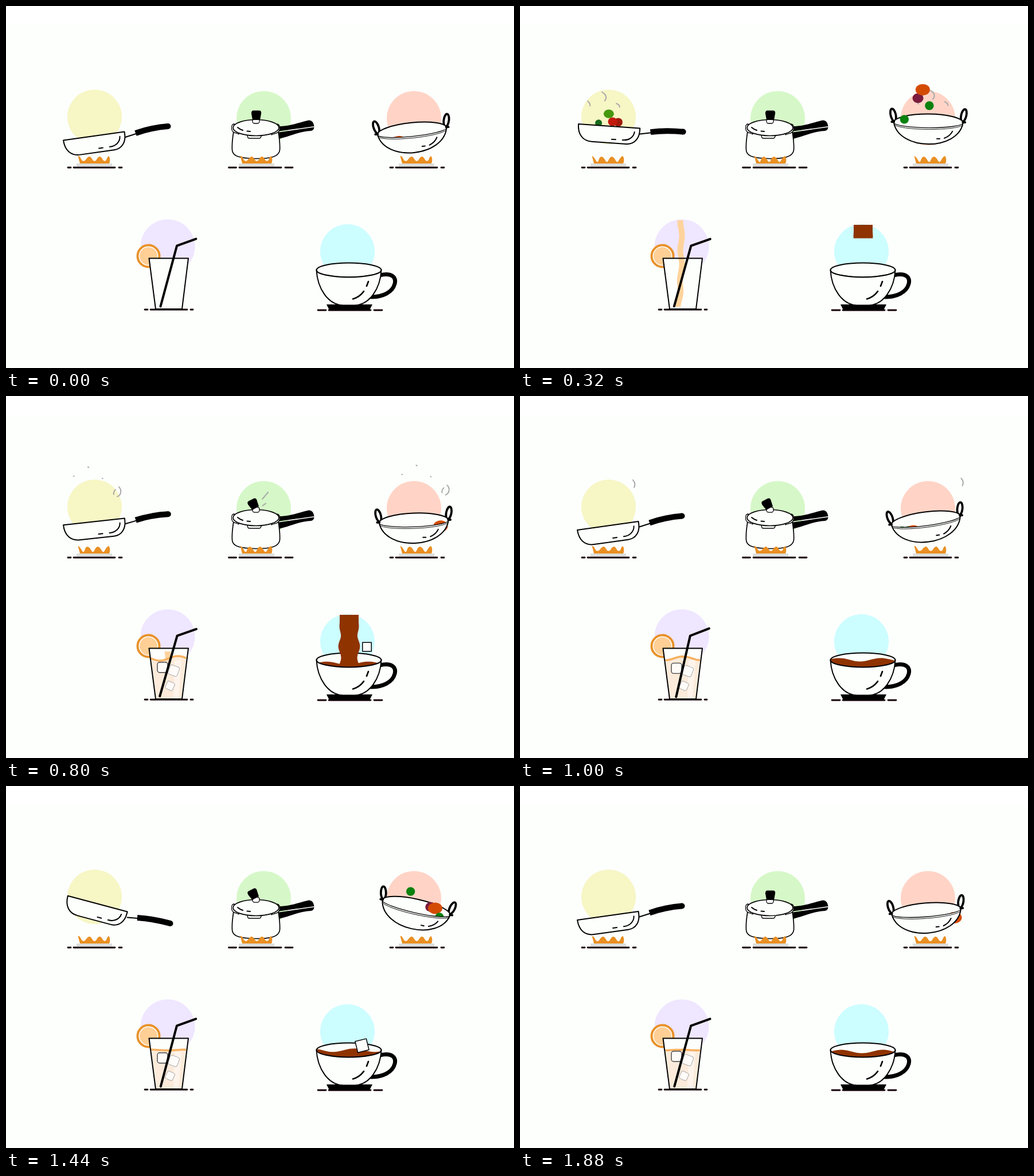
An HTML page for the animation above (1.92 s loop, 886 px wide and 632 px high).

```html
<!DOCTYPE html>
<html lang="en">
<head>
<meta charset="utf-8">
<title>Kitchen loop</title>
<style>
  html, body { margin: 0; width: 100%; height: 100%; overflow: hidden; background: #fff; }
  svg { display: block; width: 100vw; height: 100vh; }
  .line { fill: none; stroke: #000; stroke-width: 2; stroke-linecap: round; stroke-linejoin: round; }
  .body { fill: #fdfffd; stroke: #000; stroke-width: 2; stroke-linejoin: round; }
  .fill { fill: #fdfffd; }
  .thin { stroke-width: 1.3; }
  .thick { stroke-width: 3.8; }
  .floor { fill: none; stroke: #160008; stroke-width: 2.8; stroke-linecap: round; }
  .steam { fill: none; stroke: #a9a9a9; stroke-width: 2; stroke-linecap: round; }
  .flame { fill: #e98f23; }
  .coffee { fill: #8f3300; }
  .ice { fill: #fff; fill-opacity: .8; stroke: #aaa; }
</style>
</head>
<body>
<svg viewBox="0 0 886 632">
  <defs>
    <clipPath id="inGlass"><path d="M250.500 441H316.500L306 528H262Z"/></clipPath>
    <clipPath id="inCup"><ellipse cx="598" cy="461" rx="56" ry="12.500"/></clipPath>
  </defs>
  <rect class="fill" y="32" width="886" height="600"/>
  <circle cx="154.500" cy="193.500" r="47.500" fill="#f7f6c5"/>
  <circle cx="449.500" cy="196" r="47.500" fill="#d6f8c8"/>
  <circle cx="711.500" cy="196" r="47.500" fill="#ffd4c6"/>
  <circle cx="282" cy="420" r="47.500" fill="#efe6ff"/>
  <circle cx="595.500" cy="428.500" r="47.500" fill="#ccfdff"/>

  <!-- stoves -->
  <path fill="#dcdedc" d="M123 275h62v5h-62zM406 275h62v5h-62zM685 275h62v5h-62z"/>
  <path class="floor" d="M108 282h5M118 282h72M197 282h5M388.500 282h13M407 282h73M487 282h13M670 282h5M680 282h72M759 282h5M242 530h5M252 530h64M322 530h4M544 531h14M563 531h73M642 531h14"/>
  <path class="flame" id="flame0"/>
  <path class="flame" id="flame2" transform="translate(562)"/>

  <!-- frying pan -->
  <g id="panSteam"></g>
  <g id="panFood"></g>
  <path class="line" id="rod"/>
  <path id="grip" fill="none" stroke="#000" stroke-width="10"/>
  <circle id="gripEnd" r="5"/>
  <g id="pan">
    <path class="body" d="M-107.500 0H0V4C0 18-8 29-22 29H-82C-98 29-107.500 18-107.500 0Z"/>
    <path class="line" d="M-48 22.500h7M-29 22.500C-19 23-10 17-9 7"/>
  </g>

  <!-- pressure cooker -->
  <g id="rays"></g>
  <path d="M475 210C497 210 511 203 528 199.500Q536 199 537.500 210L477 218.500ZM476 220.500L537.500 211.500Q537 217 532 218C512 219 500 226 476 232Z"/>
  <path class="body" style="stroke-width:1.700" d="M397 219C394.500 234 394 243 394.500 251C395 263 409 266 435 266.500C463 266.500 476 263 477.500 251C478 242 477 232 475 219Z"/>
  <path class="body thin" d="M398 206Q393 206 393.500 214Q394 221 402 222L406 224L404 214ZM473 206Q478 207 477.500 215Q476 222 468 223L463 225L466 214Z"/>
  <path class="body thin" d="M420.500 224L422 230Q423 231 425 231H441Q444 231 444.500 229L446 224Z"/>
  <ellipse class="body" style="stroke-width:1.700" cx="436" cy="212.500" rx="40" ry="14"/>
  <path class="line" d="M404 212Q408 215.500 413 217M420.500 218.500L426 219"/>
  <rect class="body thin" id="knobBase" x="430" y="196" width="12" height="9" rx="3.500"/>
  <path id="knob" d="M431 182.500H442Q446 183 445 188L443 199H430L428 188Q427.500 183 431 182.500Z"/>
  <path class="flame" id="flame1" transform="translate(283)"/>

  <!-- wok -->
  <g id="wokSteam" transform="translate(572.500 -3)"></g>
  <g id="wokBack">
    <ellipse class="line thick" rx="4.500" ry="11" transform="translate(-61.500 -13) rotate(-13)"/>
    <ellipse class="line thick" rx="4.500" ry="11" transform="translate(61.500 -13) rotate(13)"/>
    <path class="fill" d="M-60.500 0A60.500 15 0 0 1 60.500 0A60.500 9 0 0 1-60.500 0Z"/>
    <path class="line" d="M-60.500 0A60.500 15 0 0 1 60.500 0"/>
  </g>
  <g id="wokFood"></g>
  <g id="wokFront">
    <path class="fill" d="M-60.500 0A60.500 9 0 0 0 60.500 0C56 25 28 37.500 0 37.500C-28 37.500-56 25-60.500 0Z"/>
    <path class="line" d="M60.500 0C56 25 28 37.500 0 37.500C-28 37.500-56 25-60.500 0"/>
    <path class="line thin" d="M-60.500 0A60.500 9 0 0 0 60.500 0"/>
    <path class="line" style="stroke-width:.900" d="M-59.500 4A60 9 0 0 0 59.500 4"/>
    <path class="line" d="M15 28h5M28 27Q38 23 42 15"/>
    <path class="line thick" d="M-64-1h4M60-1h4"/>
  </g>

  <!-- juice -->
  <circle cx="248.500" cy="436.500" r="19" fill="#fff" stroke="#e8922a" stroke-width="4"/>
  <circle cx="248.500" cy="436.500" r="15.500" fill="#ffcf96"/>
  <path class="fill" d="M249.500 440.500H318L307 529H261Z"/>
  <path id="juice" fill="#ffd39c"/>
  <g clip-path="url(#inGlass)">
    <path id="drink" fill="#fde6d2" opacity=".8"/>
    <path id="shine" fill="#fff" opacity=".45"/>
    <path id="surface" fill="none" stroke="#f7b060" stroke-width="3.500"/>
  </g>
  <g id="cubes">
    <rect class="ice" x="-7" y="-7" width="14" height="14" rx="3"/>
    <rect class="ice" x="-8.500" y="-8.500" width="17" height="17" rx="3.500"/>
    <rect class="ice" x="-9" y="-9" width="18" height="18" rx="4" style="stroke:#444;stroke-width:1.400"/>
  </g>
  <path class="line" d="M249.500 440.500H318L307 529H261Z"/>
  <path class="line" id="straw" style="stroke-width:4"/>

  <!-- coffee cup -->
  <path d="M559 521H639L634 531H564Z"/>
  <path class="line" style="stroke-width:7" d="M652 470C672 465 681 473 678 485C674 500 657 508 637 508"/>
  <ellipse class="body" cx="598" cy="461" rx="56.500" ry="12.500"/>
  <g clip-path="url(#inCup)"><path class="coffee" id="coffee"/></g>
  <path class="coffee" id="pour"/>
  <rect class="body" id="sugar" style="stroke-width:1.500"/>
  <path class="body" d="M541.500 461A56.500 12.500 0 0 0 654.500 461C653 493 634 522 608 522.500H588C562 522 543 493 541.500 461Z"/>
  <path class="line" style="stroke-width:2.600" d="M632 481L629 489M624 498Q617 508 605 511.500"/>
  <g id="dropL"><rect class="coffee" x="-7.500" y="-2.700" width="15" height="5.400" rx="2.600"/></g>
  <g id="dropR"><rect class="coffee" x="-6.500" y="-1.500" width="13" height="3" rx="1.500"/></g>
</svg>
<script>
const LOOP = 1920, TOSS = 960, STEP = 40;
const $ = id => document.getElementById(id);
const clamp = v => Math.min(1, Math.max(0, v));
const progress = (t, from, to) => clamp((t - from) / (to - from));
const ramp = (t, from, to) => { const u = progress(t, from, to); return u * u * (3 - 2 * u); };
const swing = (v, period, peak) => Math.cos((v - peak) / period * 2 * Math.PI);
const set = (node, attrs) => { for (const k in attrs) node.setAttribute(k, attrs[k]); };
const put = (node, x, y, tilt = 0) => set(node, { transform: `translate(${x} ${y}) rotate(${tilt})` });
const show = (node, on) => { node.style.display = on ? "" : "none"; };
const trace = pts => "M" + pts.map(p => p.join(" ")).join("L");
const range = (a, b, step) => Array.from({ length: Math.ceil((b - a) / step) + 1 }, (_, i) => Math.min(b, a + i * step));
function add(parent, tag, attrs) {
  const node = document.createElementNS("http://www.w3.org/2000/svg", tag);
  set(node, attrs);
  return $(parent).appendChild(node);
}
// A vertical ribbon around mid(y), half(y) wide on each side.
function ribbon(node, top, end, mid, half) {
  show(node, end > top);
  if (end <= top) return;
  const ys = range(top, end, 3);
  const right = ys.map(y => [mid(y) + half(y), y]).reverse();
  set(node, { d: trace([...ys.map(y => [mid(y) - half(y), y]), ...right]) + "Z" });
}

// Each piece flies a parabola: apex time and height, half the flight time, x and drift.
const food = (parent, fill, rx, ry, apex, high, span, x, drift, sink = 40) =>
  ({ node: add(parent, "ellipse", { rx, ry, fill }), inWok: parent === "wokFood", apex, high, span, x, drift, sink });
const foods = [
  food("panFood", "#176b1b", 6, 6, 282, 200, 100, 128, 19),
  food("panFood", "#a01a0b", 7.5, 7.5, 245, 186, 121, 144.5, 41),
  food("panFood", "#c21a0c", 8, 7.5, 253, 188.5, 118, 140, 35),
  food("panFood", "#47980e", 9, 7.5, 282, 184, 124, 142, 30),
  food("wokFood", "#7c1c3e", 9.5, 8.5, 343, 159.5, 171, 680, 75),
  food("wokFood", "#d44c04", 12.5, 10, 328, 146, 176, 686, 72, 4),
  food("wokFood", "#0b810e", 7.7, 7.7, 260, 163, 159, 676, 80),
  food("wokFood", "#0b810e", 7.7, 7.7, 423, 178, 182, 666, 92)
];

const wisp = (full, d) => ({
  full, nodes: ["panSteam", "wokSteam"].map(g => add(g, "path", { class: "steam", pathLength: 1, d }))
});
const wisps = [
  wisp(560, "M118 147C126 152 119 157 125 164"),
  wisp(560, "M143 131C154 138 151 145 144 149C138 153 140 158 145 160"),
  wisp(560, "M168 151C176 154 176 161 167 163"),
  wisp(680, "M191 167C184 174 190 177 192 183"),
  wisp(920, "M197 149C203 156 200 164 194 166")
];

const ray = (start, length, x1, y1, x2, y2) =>
  ({ start, length, x1, y1, x2, y2, node: add("rays", "line", { class: "steam" }) });
const rays = [
  ray(440, .53, 424, 191, 376, 178), ray(380, .1, 424, 185, 366, 147),
  ray(700, .42, 442, 186, 466, 157.5), ray(730, .2, 443, 195, 470, 175)
];

function flame(s) {
  const tips = [0, 1, 2, 3].map(i => [125.5 + 18 * i + (i % 3 ? 1.5 * s : 0), 262 + (i % 3 ? 1 : 0)]);
  const width = 3.5 + s, low = 271.5 - s;
  let d = `M129 275Q127.500 269 ${tips[0]}`;
  for (let i = 0; i < 3; i++) {
    const [x, y] = tips[i], [nx, ny] = tips[i + 1], v = x + 9.5;
    d += `C${x + 5} ${y - s} ${v - width} ${low} ${v} ${low}C${v + width} ${low} ${nx - 5} ${ny + 1 + s} ${nx} ${ny}`;
  }
  return d + "Q183 268 180 275Z";
}

function drawStoves(t) {
  const d = flame(swing(t, 480, 40));
  for (let i = 0; i < 3; i++) set($("flame" + i), { d });
}

function drawPan(p) {
  const k = ((1 + swing(p, TOSS, 490)) / 2) ** 2;
  const x = 206.5 + 5.2 * k, y = 215.5 + 4 * swing(p, TOSS / 2, 0);
  const gx = 226 + 3 * k, gy = y + 2.5 + 8 * k;
  const ex = 282.5 + 4 * k, ey = gy - 12 + 22 * k;
  put($("pan"), x, y, 23 * k - 8);
  set($("rod"), { d: `M${x} ${y + 10}L${gx + 1} ${gy + 1}` });
  set($("grip"), { d: `M${gx} ${gy}Q${(gx + ex) / 2} ${gy - 10 + 12 * k} ${ex} ${ey}` });
  set($("gripEnd"), { cx: ex, cy: ey });
}

function drawWok(p) {
  const sway = swing(p, TOSS, 540);
  const x = 711.8 + 4 * sway;
  const y = 214 - 8 * swing(p, TOSS, 300) + 2.5 * swing(p, TOSS / 2, 67);
  const tilt = 10 * sway + 3.5 * swing(p, TOSS / 2, -20);
  put($("wokBack"), x, y, tilt);
  put($("wokFront"), x, y, tilt);
  return y;
}

function drawFood(p, wokY) {
  for (const f of foods) {
    const u = (p - f.apex) / f.span, w = clamp((u + 1) / 2);
    const depth = u < 0 ? 18 : 1 + f.sink * Math.max(0, u - 1);
    const base = f.inWok ? 240 : 230;
    const y = f.high + (base - f.high) * u * u;
    show(f.node, f.inWok ? depth < 22 : Math.abs(u) < 1);
    put(f.node, f.x + f.drift * w * w, f.inWok ? Math.min(y, wokY + depth) : y);
  }
}

// Wisps grow downwards while rising, then shrink back to their tops.
function drawSteam(t) {
  for (const { full, nodes } of wisps) {
    const v = t - full, shown = Math.min(clamp((v + 360) / 240), 1 - v / 250);
    for (const node of nodes) {
      show(node, shown > .01);
      put(node, 0, -v * (v < 0 ? .08 : .03));
      set(node, { "stroke-dasharray": `${clamp(shown)} 2` });
    }
  }
}

function drawCooker(t) {
  const a = -28 * ramp(t, 420, 660) * (1 - ramp(t, 1720, 1860));
  set($("knob"), { transform: `translate(0 ${a * .15}) rotate(${a} 438 202)` });
  put($("knobBase"), 0, a * .07);
  for (const { start, length, x1, y1, x2, y2, node } of rays) {
    const h = (t - start) / 225 * (1 + length), head = clamp(h), tail = clamp(h - length);
    show(node, head > tail);
    set(node, {
      x1: x1 + (x2 - x1) * tail, y1: y1 + (y2 - y1) * tail,
      x2: x1 + (x2 - x1) * head, y2: y1 + (y2 - y1) * head
    });
  }
}

function drawJuice(t) {
  const fill = ramp(t, 280, 800);
  const level = 531 - 73 * fill + 3 * ramp(t, 1000, 1500);
  const amp = 4 * fill * (1 - .85 * ramp(t, 800, 1500));
  const top = 374 + 90 * progress(t, 640, 840);
  const end = 374 + 151 * progress(t, 180, 300) - 60 * progress(t, 600, 800);
  const mid = y => 281 + 1.5 * Math.sin(y / 8 - t / 70) - Math.max(0, y - 470) * .08;
  ribbon($("juice"), top, end, mid, () => 5);

  const wave = right => range(248, right, 4).map(x => [x, level + amp * Math.sin(x / 10 + t / 130)]);
  set($("drink"), { d: trace([...wave(320), [320, 532], [248, 532]]) + "Z" });
  set($("surface"), { d: trace(wave(283 + 37 * ramp(t, 600, 760))) });
  set($("shine"), { d: `M294 ${level + 3}H306L301 530H292Z` });
  show($("surface"), t > 400);
  show($("shine"), t > 320);

  [...$("cubes").children].forEach((cube, i) => {
    const start = 440 + 110 * i, sunk = ramp(t, start, start + 120);
    const rest = 506 - 16 * i * (i > 1 ? 1 : 1.65);
    const bob = i * swing(t, 1400, 1180);
    show(cube, t > start);
    put(cube, [286, 292.5, 273][i], 440 + (rest - 440) * sunk + bob, [25, 21, 0][i] * sunk);
  });

  const k = -1.2 * swing(t, 1200, 560) * Math.sin(Math.PI * t / LOOP);
  set($("straw"), { d: `M${269.5 + 3.5 * k} ${524.5 + k}L${298 - 1.5 * k} 418.700L${331.3 - 1.9 * k} ${406.6 - k}` });
}

function drawCoffee(t) {
  const fall = (from, to) => 382 + 94 * progress(t, from, to);
  const half = y => 16.5 + 2.4 * clamp((y - 395) / 25) * swing(y, 40, 437);
  ribbon($("pour"), fall(860, 1000), fall(275, 455), () => 598.5, half);

  const level = 478 - 17.5 * ramp(t, 560, 960) + 3 * ramp(t, 1200, 1900);
  const crest = 632 - 72 * progress(t, 800, 1880) ** 2;
  const wave = range(540, 656, 4).map(x => [x, level - 3 * swing(x, 73, crest)]);
  set($("coffee"), { d: trace([...wave, [656, 480], [540, 480]]) + "Z" });
  show($("coffee"), t > 580);

  // One lump drops in, a larger one bobs up and sinks.
  const drop = progress(t, 680, 880), bob = progress(t, 1220, 1700);
  const size = bob ? 20 : 15.5;
  set($("sugar"), { x: -size / 2, y: -size / 2, width: size, height: size });
  if (bob) put($("sugar"), 621, 488 - 35 * Math.sin(Math.PI * bob), 35 * bob - 30);
  else put($("sugar"), 629.5, 372 + 110 * drop);
  show($("sugar"), bob ? bob < 1 : drop > 0 && drop < 1);

  const splash = Math.sin(Math.PI * progress(t, 1000, 1280));
  for (const [id, x, y, tilt] of [["dropL", 561, 444, -14], ["dropR", 641.5, 440.5, 4]]) {
    set($(id), { transform: `translate(${x} ${y + 16 * (1 - splash)}) rotate(${tilt}) scale(${splash})` });
    show($(id), splash > .01);
  }
}

function draw(t) {
  const p = t % TOSS;
  drawStoves(t);
  drawPan(p);
  drawFood(p, drawWok(p));
  drawSteam(t);
  drawCooker(t);
  drawJuice(t);
  drawCoffee(t);
}

const start = performance.now();
function tick() {
  const t = (performance.now() - start) % LOOP;
  draw(Math.floor(t / STEP) * STEP);
  requestAnimationFrame(tick);
}
tick();
</script>
</body>
</html>
```
